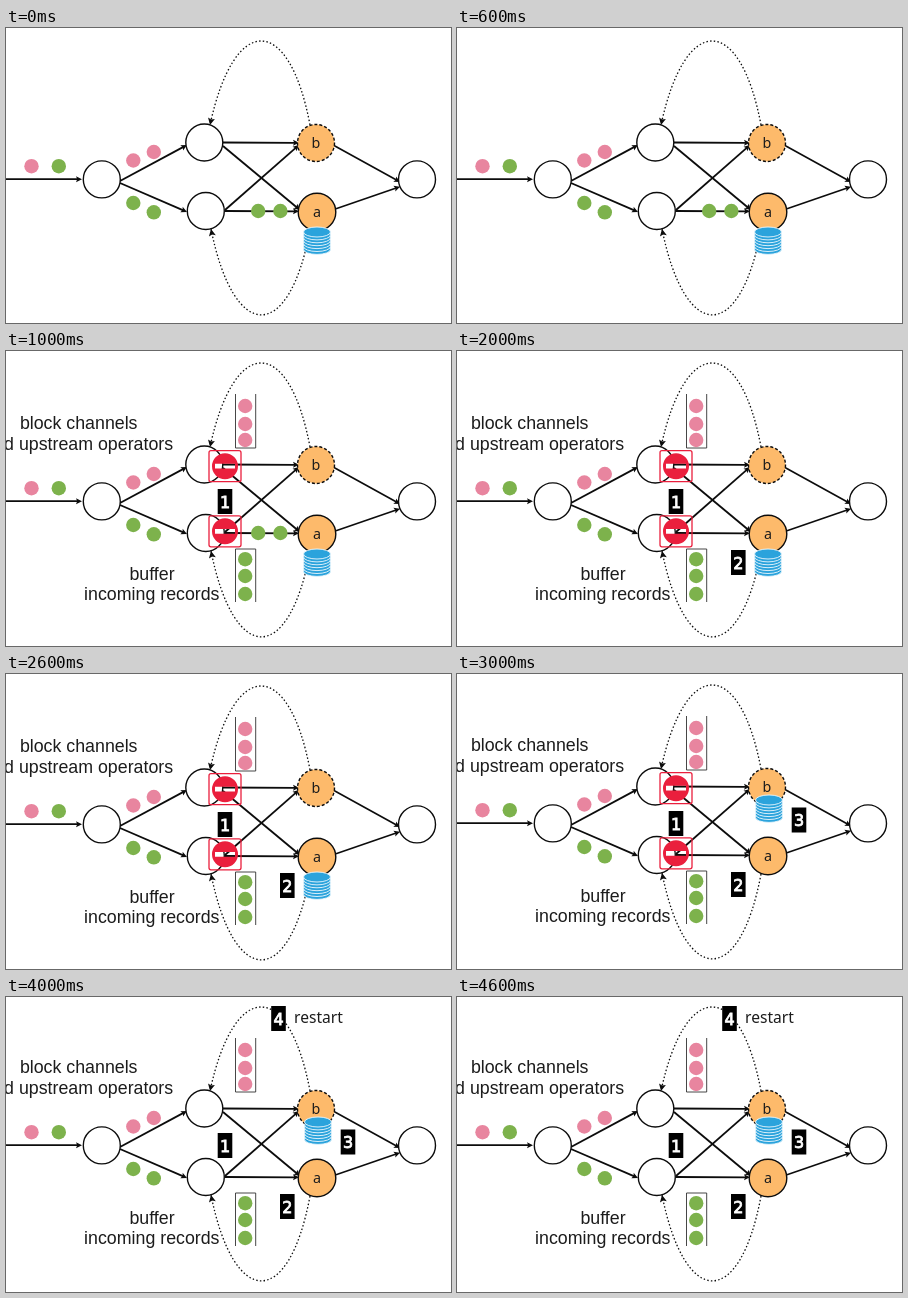
Recreate the animation shown at these times as an HTML page with a canvas. Size 445x295 px, loop 5 s.

```html
<!DOCTYPE html>
<html lang="en">
<head>
<meta charset="utf-8">
<title>Operator state migration</title>
<style>
html, body { margin: 0; width: 100%; height: 100%; overflow: hidden; background: #fff; }
canvas { display: block; width: 445px; height: 295px; }
</style>
</head>
<body>
<canvas id="stage"></canvas>
<script>
const W = 445, H = 295, STEP = 1000, STEPS = 5;
const PINK = '#e8859f', GREEN = '#7db24c', ORANGE = '#fdba6b', BLUE = '#2ba3dc', RED = '#ea1f3d', INK = '#0c0c0c';
const SANS = '"Liberation Sans", Arial, sans-serif';
const HUMAN = '"Noto Sans", "Open Sans", sans-serif';
const LIFT = [0, -1, -1, -2, -3]; // the diagram creeps up with each step

const canvas = document.getElementById('stage');
const ctx = canvas.getContext('2d');
const ratio = window.devicePixelRatio || 1;
canvas.width = W * ratio;
canvas.height = H * ratio;

function dot(x, y, color, r = 7.2) {
  ctx.beginPath();
  ctx.arc(x, y, r, 0, Math.PI * 2);
  ctx.fillStyle = color;
  ctx.fill();
}

function node(x, y, fill = '#fff', dash = [], r = 18.5) {
  dot(x, y, fill, r);
  ctx.setLineDash(dash);
  ctx.lineWidth = 1.4;
  ctx.strokeStyle = INK;
  ctx.stroke();
  ctx.setLineDash([]);
}

function head(x, y, angle, size = 6) {
  ctx.save();
  ctx.translate(x, y);
  ctx.rotate(angle);
  ctx.beginPath();
  ctx.moveTo(0, 0);
  ctx.lineTo(-size, -size / 2);
  ctx.lineTo(-size * 0.8, 0);
  ctx.lineTo(-size, size / 2);
  ctx.closePath();
  ctx.fillStyle = INK;
  ctx.fill();
  ctx.restore();
}

function arrow(x1, y1, x2, y2, width = 1.8) {
  const a = Math.atan2(y2 - y1, x2 - x1);
  ctx.beginPath();
  ctx.moveTo(x1, y1);
  ctx.lineTo(x2 - 4 * Math.cos(a), y2 - 4 * Math.sin(a));
  ctx.lineWidth = width;
  ctx.strokeStyle = INK;
  ctx.stroke();
  head(x2, y2, a);
}

function feedback(y, bend, endX, endY) {
  ctx.beginPath();
  ctx.moveTo(304, y);
  ctx.bezierCurveTo(283, bend, 228, bend, endX, endY);
  ctx.setLineDash([1.5, 2.2]);
  ctx.lineWidth = 1.3;
  ctx.strokeStyle = INK;
  ctx.stroke();
  ctx.setLineDash([]);
  head(endX, endY, Math.atan2(endY - bend, endX - 228), 7);
}

function text(str, x, y, font, color = '#1c1c1c', align = 'center') {
  ctx.font = font;
  ctx.fillStyle = color;
  ctx.textAlign = align;
  ctx.fillText(str, x, y);
}

function badge(n, x, y) {
  ctx.fillStyle = '#000';
  ctx.fillRect(x - 7.3, y - 12.5, 14.6, 25);
  text(n, x, y + 6, '16px "DejaVu Sans", sans-serif', '#fff');
  ctx.lineWidth = 0.8;
  ctx.strokeStyle = '#fff';
  ctx.strokeText(n, x, y + 6);
}

function database(x, y) {
  for (let i = 6; i >= 0; i--) {
    ctx.beginPath();
    ctx.ellipse(x, y + i * 2.9, 13.5, 5, 0, 0, Math.PI * 2);
    ctx.fillStyle = BLUE;
    ctx.fill();
    ctx.lineWidth = 0.9;
    ctx.strokeStyle = '#eef8fd';
    ctx.stroke();
  }
}

function stopSign(x, y) {
  ctx.beginPath();
  ctx.arc(x, y, 13, 0, Math.PI * 2);
  ctx.rect(x - 10, y - 2.4, 20, 4.8); // open slot
  ctx.fillStyle = RED;
  ctx.fill('evenodd');
  ctx.beginPath();
  ctx.roundRect(x - 16, y - 15.5, 32, 31, 2);
  ctx.lineWidth = 1.3;
  ctx.strokeStyle = RED;
  ctx.stroke();
}

function queue(top, bottom, closedY, ys, color) {
  ctx.beginPath();
  for (const x of [229.5, 249.7]) {
    ctx.moveTo(x, top);
    ctx.lineTo(x, bottom);
  }
  ctx.moveTo(229.5, closedY);
  ctx.lineTo(249.7, closedY);
  ctx.lineWidth = 0.9;
  ctx.strokeStyle = '#333';
  ctx.stroke();
  ys.forEach(y => dot(239.2, y, color));
}

function network() {
  feedback(97, -15, 204, 97);
  feedback(202, 315.3, 205, 201);

  arrow(0, 151.2, 76, 151.2);
  arrow(114, 153, 181, 117);
  arrow(114, 155, 181, 184);
  arrow(217, 114.5, 293, 114.8);
  arrow(217, 118, 294, 182);
  arrow(219, 182, 293, 117);
  arrow(219, 183, 293, 183.3);
  arrow(328, 117.5, 394, 154, 1.6);
  arrow(330, 180.7, 394, 158.7, 1.6);

  node(95.8, 151.4);
  node(198.3, 114.5);
  node(199.8, 183);
  node(411, 151.4);
  node(310, 115, ORANGE, [3, 2]);
  node(311, 184, ORANGE, [], 18.8);
  text('b', 310, 120.3, '14.3px ' + HUMAN);
  text('a', 311, 189, '14.3px ' + HUMAN);

  dot(25.5, 138.2, PINK);
  dot(52.8, 138.2, GREEN);
  dot(127.3, 132.5, PINK);
  dot(147.8, 124, PINK);
  dot(127.3, 175, GREEN);
  dot(147.8, 184.3, GREEN);
}

function buffering() {
  const font = '17.8px ' + SANS;
  text('block channels', 72.7, 78.8, font);
  text('and upstream operators', 72.7, 99.5, font);
  text('buffer', 146, 229.6, font);
  text('incoming records', 145.8, 250.3, font);
  queue(44, 98, 98, [56, 74, 90], PINK);
  queue(199, 252, 199, [209.2, 226, 244], GREEN);
  badge('1', 219, 151.5);
}

function draw(step) {
  ctx.setTransform(ratio, 0, 0, ratio, 0, 0);
  ctx.fillStyle = '#fff';
  ctx.fillRect(0, 0, W, H);
  ctx.translate(0, LIFT[step]);

  network();
  if (step < 2) {
    dot(252.2, 183, GREEN);
    dot(274.4, 183, GREEN);
  }
  if (step > 0) buffering();
  if (step > 0 && step < 4) {
    stopSign(219, 116.2);
    stopSign(219, 181.3);
  }
  if (step > 1) badge('2', 281.3, 212.5);
  if (step < 3) database(311, 204);
  else {
    database(312, 128);
    badge('3', 342, 148);
  }
  if (step > 3) {
    badge('4', 272.5, 24.5);
    text('restart', 288, 29, '15.6px ' + HUMAN, '#1c1c1c', 'left');
  }
}

const start = performance.now();
function tick() {
  const t = performance.now() - start;
  draw(Math.floor(t / STEP) % STEPS);
  requestAnimationFrame(tick);
}
tick();
</script>
</body>
</html>
```
